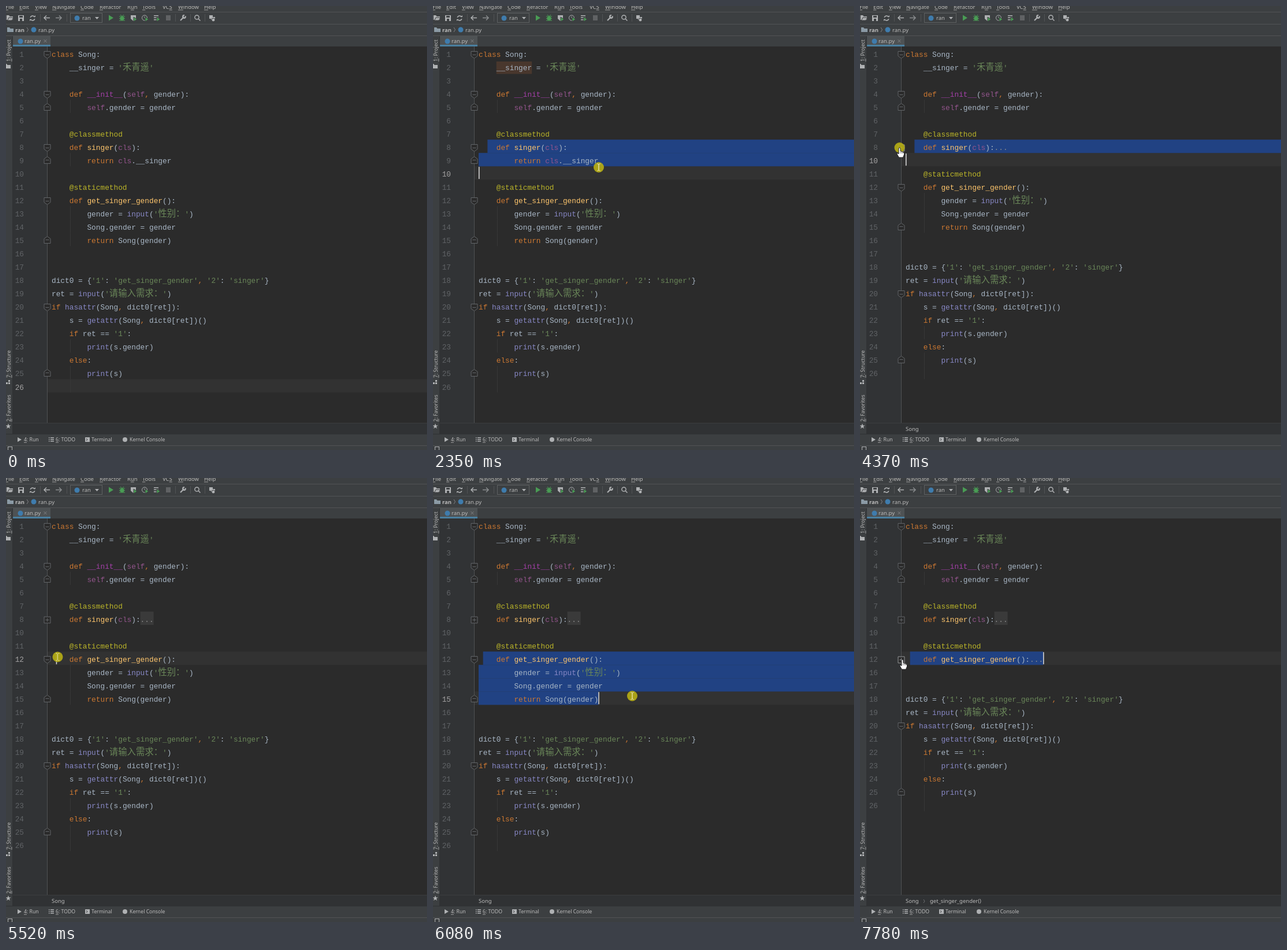
An HTML page with a canvas for the animation above (8000 ms loop, 729 by 768 pixels).

```html
<!DOCTYPE html>
<html lang="en">
<head>
<meta charset="utf-8">
<title>Code folding</title>
<style>
html, body { margin: 0; width: 100%; height: 100%; overflow: hidden; background: #2b2b2b; }
canvas { display: block; }
</style>
</head>
<body>
<canvas id="stage" width="729" height="768"></canvas>
<script>
const ctx = document.getElementById('stage').getContext('2d');
const LOOP = 8000, STEP = 76, WIDTH = 729;
const LEFT = 79, TOP = 70, CELL = 7.68, ROW = 23.02;
const CODE = '12.8px "Liberation Mono", monospace';
const CJK = '300 15.36px "Noto Sans CJK SC", "Noto Sans CJK", sans-serif';
const UI = '9.5px "Noto Sans", sans-serif';
const SMALL = '8.7px "Noto Sans", sans-serif';
const PANEL = '#3c3f41', EDGE = '#2f3133', ICON = '#afb1b3', GREEN = '#499c54', LABEL = '#bbbbbb';

const lines = `class Song:
    __singer = '禾青遥'

    def __init__(self, gender):
        self.gender = gender

    @classmethod
    def singer(cls):
        return cls.__singer

    @staticmethod
    def get_singer_gender():
        gender = input('性别：')
        Song.gender = gender
        return Song(gender)


dict0 = {'1': 'get_singer_gender', '2': 'singer'}
ret = input('请输入需求：')
if hasattr(Song, dict0[ret]):
    s = getattr(Song, dict0[ret])()
    if ret == '1':
        print(s.gender)
    else:
        print(s)
`.split('\n');

// First match wins; everything else takes the plain colour.
const syntax = [
  [/^'.*'$/, '#6a8759'], [/^@/, '#bbb529'], [/^(class|def|return|if|else|,)$/, '#cc7832'],
  [/^(self|cls)$/, '#94558d'], [/^__init__$/, '#a33fa8'],
  [/^(input|hasattr|getattr|print)$/, '#8888c6']
];
const foldStarts = [1, 4, 8, 12, 20], foldEnds = [5, 9, 15, 25];
const folds = [{ from: 8, to: 9, step: 56 }, { from: 12, to: 15, step: 100 }];
const drags = [
  { press: 27, release: 36, line: 8, col: 2 },
  { press: 72, release: 83, line: 12, col: 1 }
];
const clicks = [[27, 36], [55, 57], [72, 83], [99, 101]];

// Mouse path: step, x, y
const path = [
  [1, 581, 723], [4, 192, 484], [5, 192, 484], [10, 122, 345], [15, 76, 247], [16, 81.5, 242.5],
  [18, 81.5, 242.5], [21, 97.5, 242.5], [27, 97.5, 242.5], [29, 160, 252], [31, 287, 279],
  [36, 306, 279], [37, 306, 279], [41, 89.5, 362.5], [43, 89.5, 362.5], [47, 192, 335],
  [54, 68.5, 245], [61, 68.5, 245], [69, 89.5, 309.5], [72, 89.5, 309.5], [74, 130, 313],
  [76, 218, 323.5], [80, 345, 377], [83, 346, 387], [85, 346, 387], [89, 200, 352],
  [91, 58, 322], [93, 73.5, 314], [106, 73.5, 314]
];

function mouseAt(step) {
  const i = Math.max(1, path.findIndex(p => p[0] >= step));
  const [s0, x0, y0] = path[i - 1], [s1, x1, y1] = path[i];
  const k = (step - s0) / (s1 - s0);
  return { x: x0 + (x1 - x0) * k, y: y0 + (y1 - y0) * k };
}

function rect(x, y, w, h, color) {
  ctx.fillStyle = color;
  ctx.fillRect(x, y, w, h);
}

function shape(points, fill, stroke, open) {
  ctx.beginPath();
  points.forEach(([x, y]) => ctx.lineTo(x, y));
  if (!open) ctx.closePath();
  if (fill) { ctx.fillStyle = fill; ctx.fill(); }
  if (stroke) { ctx.strokeStyle = stroke; ctx.stroke(); }
}

const line = (points, color) => shape(points, null, color, true);

function circle(x, y, r, fill, stroke) {
  ctx.beginPath();
  ctx.arc(x, y, r, 0, 7);
  if (fill) { ctx.fillStyle = fill; ctx.fill(); }
  if (stroke) { ctx.strokeStyle = stroke; ctx.stroke(); }
}

function text(str, x, y, color, font, underlined = -1) {
  ctx.font = font;
  ctx.fillStyle = color;
  ctx.fillText(str, x, y);
  if (underlined < 0) return;
  const start = ctx.measureText(str.slice(0, underlined)).width;
  ctx.fillRect(x + start, y + 1.5, ctx.measureText(str[underlined]).width, 0.8);
}

function sideText(str, bottom) {
  ctx.save();
  ctx.translate(8, bottom);
  ctx.rotate(-Math.PI / 2);
  text(str, 0, 0, LABEL, SMALL, 0);
  ctx.restore();
}

function folder(x, y, color) {
  shape([[x, y], [x + 4, y], [x + 5.5, y + 2], [x + 11, y + 2], [x + 11, y + 8], [x, y + 8]], color);
}

function drawToolbar() {
  rect(0, 0, WIDTH, 70, PANEL);
  const menu = [['File', 0, -1], ['Edit', 0, 23], ['View', 0, 50], ['Navigate', 0, 80], ['Code', 0, 129],
    ['Refactor', 0, 162], ['Run', 1, 210], ['Tools', 0, 236], ['VCS', 2, 271], ['Window', 0, 298], ['Help', 0, 343]];
  menu.forEach(([name, key, x]) => text(name, x, 5, LABEL, UI, key));
  for (const y of [10, 31, 51]) rect(0, y, WIDTH, 1, '#515355');
  for (const x of [59, 105, 293, 319, 344]) rect(x, 14, 1, 13, '#515355');

  folder(1, 16, ICON);
  shape([[3, 24], [5, 20], [13, 20], [10, 25], [2, 25]], ICON, PANEL);
  rect(21, 16, 10, 10, ICON);
  rect(23, 17, 6, 3, PANEL);
  rect(24, 22, 4, 4, PANEL);
  ctx.lineWidth = 1.5;
  ctx.strokeStyle = ICON;
  for (const a of [0.3, 3.44]) {
    ctx.beginPath();
    ctx.arc(46, 21, 4, a, a + 2.4);
    ctx.stroke();
  }
  shape([[48, 19], [51, 19], [51, 16]], ICON);
  shape([[44, 23], [41, 23], [41, 26]], ICON);
  line([[76, 20.5], [66, 20.5]], ICON);
  line([[70, 16.5], [66, 20.5], [70, 24.5]], ICON);
  line([[86, 20.5], [96, 20.5]], '#8a8c8e');
  line([[92, 16.5], [96, 20.5], [92, 24.5]], '#8a8c8e');
  ctx.lineWidth = 1;

  ctx.strokeStyle = '#5e6162';
  ctx.strokeRect(111.5, 12.5, 55, 16);
  circle(123, 21, 4.5, '#3f7cad');
  text('ran', 132, 24, LABEL, UI);
  shape([[154, 19], [161, 19], [157.5, 23]], ICON);
  shape([[178, 15.5], [186, 20.5], [178, 25.5]], GREEN);
  circle(201, 21.5, 3.6, GREEN);
  for (const y of [18, 21.5, 25]) line([[196, y], [206, y]], GREEN);
  line([[198, 15], [201, 18], [204, 15]], GREEN);
  shape([[216, 16], [225, 16], [225, 22], [220.5, 26], [216, 22]], ICON);
  shape([[221, 19], [227, 23], [221, 27]], GREEN, PANEL);
  circle(240, 20.5, 4.5, null, ICON);
  line([[240, 18], [240, 21]], ICON);
  shape([[241, 19], [247, 23], [241, 27]], GREEN, PANEL);
  for (const y of [16, 19.5, 23]) rect(256, y, 8, 1.5, ICON);
  shape([[261, 19], [267, 23], [261, 27]], GREEN, PANEL);
  rect(277, 16, 8, 9, '#606264');
  ctx.lineWidth = 2.2;
  line([[302, 25], [308, 19]], ICON);
  circle(308.5, 18.5, 2.3, null, ICON);
  shape([[308, 18], [310, 14], [313, 17]], PANEL);
  ctx.lineWidth = 1.5;
  circle(330.5, 19.5, 3.6, null, ICON);
  line([[333, 22], [336.5, 25.5]], ICON);
  ctx.lineWidth = 1;
  rect(352, 16, 6, 6, ICON);
  rect(355, 19, 7, 5, ICON);
  circle(359, 24, 3, ICON, PANEL);

  folder(2, 37, '#8b9aa5');
  text('ran', 16, 45, LABEL, 'bold ' + UI);
  line([[36, 37], [38.5, 41], [36, 45]], '#808285');
  circle(48, 41, 4.5, '#3f7cad');
  text('ran.py', 56, 45, LABEL, UI);
  rect(12, 52, 65, 18, '#4e5254');
  rect(12, 67, 65, 3, '#4a7f9f');
  circle(25, 61, 4.5, '#3f7cad');
  text('ran.py', 32, 64, LABEL, UI);
  line([[65.5, 58], [70.5, 63]], '#808285');
  line([[70.5, 58], [65.5, 63]], '#808285');
}

function drawPanels(step) {
  rect(0, 52, 11, 689, PANEL);
  rect(11, 52, 1, 689, EDGE);
  sideText('1: Project', 96);
  folder(-3, 100, ICON);
  sideText('7: Structure', 643);
  rect(0, 651, 3, 3, ICON);
  rect(4, 651, 3, 3, ICON);
  rect(4, 647, 3, 3, ICON);
  sideText('2: Favorites', 719);
  const star = Array.from({ length: 10 }, (_, i) => {
    const a = i * Math.PI / 5 - Math.PI / 2, r = i % 2 ? 2 : 5;
    return [4 + r * Math.cos(a), 727 + r * Math.sin(a)];
  });
  shape(star, ICON);

  rect(12, 721, WIDTH, 20, '#303234');
  rect(12, 721, WIDTH, 1, '#3b3d3f');
  if (step >= 36) text('Song', 79, 735, LABEL, UI);
  if (step >= 83) {
    line([[110, 729], [112, 732], [110, 735]], '#707274');
    text('get_singer_gender()', 121, 735, LABEL, UI);
  }
  rect(0, 740, WIDTH, 28, PANEL);
  rect(0, 740, WIDTH, 1, EDGE);
  rect(0, 760, WIDTH, 1, '#515355');
  shape([[20, 746], [27, 750], [20, 754]], ICON);
  text('4: Run', 31, 753, LABEL, SMALL, 0);
  for (const y of [746, 749, 752]) {
    rect(74, y, 1.5, 1.5, ICON);
    rect(77, y, 6, 1.5, ICON);
  }
  text('6: TODO', 86, 753, LABEL, SMALL, 0);
  rect(137, 746, 8, 8, ICON);
  line([[139, 748], [141, 750], [139, 752]], PANEL);
  text('Terminal', 148, 753, LABEL, SMALL);
  circle(206, 750, 4, ICON);
  text('Kernel Console', 214, 753, LABEL, SMALL);
  ctx.strokeStyle = ICON;
  ctx.strokeRect(3.5, 762.5, 7, 8);
}

function drawCode(source, y) {
  let col = 0, previous = '';
  for (const token of source.match(/'[^']*'|@?\w+|\s+|./g) || []) {
    const rule = syntax.find(([pattern]) => pattern.test(token));
    const color = rule ? rule[1] : previous === 'def' ? '#ffc66d' : '#a9b7c6';
    for (const run of token.match(/[\u3000-\uffff]+|[^\u3000-\uffff]+/g)) {
      const wide = run >= '\u3000';
      text(run, LEFT + col * CELL, y, color, wide ? CJK : CODE);
      col += run.length * (wide ? 2 : 1);
    }
    if (token.trim()) previous = token;
  }
}

function drawFoldIcon(y, kind, color) {
  const x = 71.5;
  const outline = kind === 'closed'
    ? [[-5.5, -5.5], [5.5, -5.5], [5.5, 5.5], [-5.5, 5.5]]
    : [[-5.5, -6], [5.5, -6], [5.5, 2], [0, 6], [-5.5, 2]];
  const flip = kind === 'end' ? -1 : 1;
  shape(outline.map(([dx, dy]) => [x + dx, y + dy * flip]), '#2b2b2b', color);
  line([[x - 3, y], [x + 3, y]], color);
  if (kind === 'closed') line([[x, y - 3], [x, y + 3]], color);
}

function drawEditor(step) {
  const closed = folds.filter(f => step >= f.step);
  const isHidden = n => closed.some(f => n > f.from && n <= f.to);
  const visible = lines.map((_, i) => i + 1).filter(n => !isHidden(n));
  const rowTop = n => TOP + visible.indexOf(n) * ROW;
  const mouse = mouseAt(step);

  const drag = drags.filter(d => step >= d.press).pop();
  let caret = { line: 26, col: 0 };
  if (drag) {
    // The caret follows the mouse until release; only folds made before the drag matter here.
    const rows = lines.map((_, i) => i + 1)
      .filter(n => !folds.some(f => f.step < drag.press && n > f.from && n <= f.to));
    const tip = mouseAt(Math.min(step, drag.release));
    const n = rows[Math.floor((tip.y - TOP) / ROW)];
    caret = { line: n, col: Math.min(Math.round((tip.x - LEFT) / CELL), lines[n - 1].length) };
  }
  const swallowed = closed.find(f => caret.line > f.from && caret.line <= f.to);
  const shown = swallowed ? { line: swallowed.from, col: lines[swallowed.from - 1].length + 3 } : caret;

  rect(12, TOP, 60, 651, '#313335');
  rect(72, TOP, WIDTH, 651, '#2b2b2b');
  rect(72, rowTop(shown.line), WIDTH, ROW, '#323232');
  if (step >= 30 && step < 34) rect(LEFT + 4 * CELL, 96, 8 * CELL, 21.5, '#49372d');
  for (const n of visible) {
    if (lines[n - 1].startsWith('        ') || n === 26) rect(111, rowTop(n), 1, ROW, '#373737');
  }
  for (const f of closed) {
    rect(LEFT + lines[f.from - 1].length * CELL, rowTop(f.from), 3 * CELL, ROW, '#3a3a3a');
  }
  if (drag) {
    for (const n of visible.filter(v => v >= drag.line && v <= shown.line)) {
      const from = LEFT + (n === drag.line ? drag.col * CELL : 0);
      const to = n === shown.line ? LEFT + shown.col * CELL : WIDTH;
      rect(from, rowTop(n), to - from, ROW + 0.1, '#214283');
    }
  }
  rect(71, TOP, 1, 651, '#505254');

  const target = foldStarts.find(n => !isHidden(n) && Math.abs(mouse.y - rowTop(n) - 11) < 12);
  const hand = step > 0 && mouse.x >= 64 && mouse.x < 79 && target;
  const hovered = hand ? [target, (folds.find(f => f.from === target) || {}).to] : [];
  for (const n of visible) {
    const y = rowTop(n);
    ctx.textAlign = 'right';
    text(n, 31, y + 18, n === caret.line ? '#a4a3a3' : '#606366', CODE);
    ctx.textAlign = 'left';
    drawCode(lines[n - 1], y + 18);
    const color = hovered.includes(n) ? '#96989a' : '#626568';
    const fold = closed.find(f => f.from === n);
    if (fold) text('...', LEFT + lines[n - 1].length * CELL, y + 18, '#8c8c8c', CODE);
    if (foldStarts.includes(n)) drawFoldIcon(Math.round(y + 13.5) + 0.5, fold ? 'closed' : 'start', color);
    if (foldEnds.includes(n)) drawFoldIcon(Math.round(y + 12) + 0.5, 'end', color);
  }
  if (drag) rect(LEFT + shown.col * CELL, rowTop(shown.line) + 1, 1.5, ROW - 2, '#dddddd');
  return { ...mouse, kind: hand ? 'hand' : mouse.x < 79 || mouse.y > 721 ? 'arrow' : 'beam' };
}

function drawMouse({ x, y, kind }, pressed) {
  if (pressed) circle(x, y, 9, 'rgba(183, 174, 20, 0.9)');
  ctx.save();
  ctx.translate(x, y);
  if (kind === 'hand') {
    shape([[-1.5, 1], [0, 0], [1.5, 1], [1.5, 6], [4, 6.5], [6, 7.5], [8, 9], [8, 12], [6, 17],
      [-1, 17], [-4.5, 11], [-4, 9], [-1.5, 11]], '#fff', '#222');
    for (const dx of [1.5, 4, 6]) line([[dx, 7], [dx, 10]], '#777');
  } else if (kind === 'arrow') {
    shape([[0, 0], [0, 15], [3.5, 12], [6, 18], [8.5, 17], [6, 11], [11, 11]], '#fff', '#222');
  } else {
    const color = pressed ? '#e4e0a0' : '#cfcfcf';
    line([[-3, -6], [-1, -6], [0, -5], [0, 5], [-1, 6], [-3, 6]], color);
    line([[3, -6], [1, -6], [0, -5], [0, 5], [1, 6], [3, 6]], color);
  }
  ctx.restore();
}

let lastStep = -1;
function frame(now) {
  const step = Math.floor((now % LOOP + 18) / STEP);
  if (step !== lastStep) {
    lastStep = step;
    ctx.lineWidth = 1;
    const mouse = drawEditor(step);
    drawToolbar();
    drawPanels(step);
    if (step > 0) drawMouse(mouse, clicks.some(([from, to]) => step >= from && step <= to));
  }
  requestAnimationFrame(frame);
}
requestAnimationFrame(frame);
</script>
</body>
</html>
```
